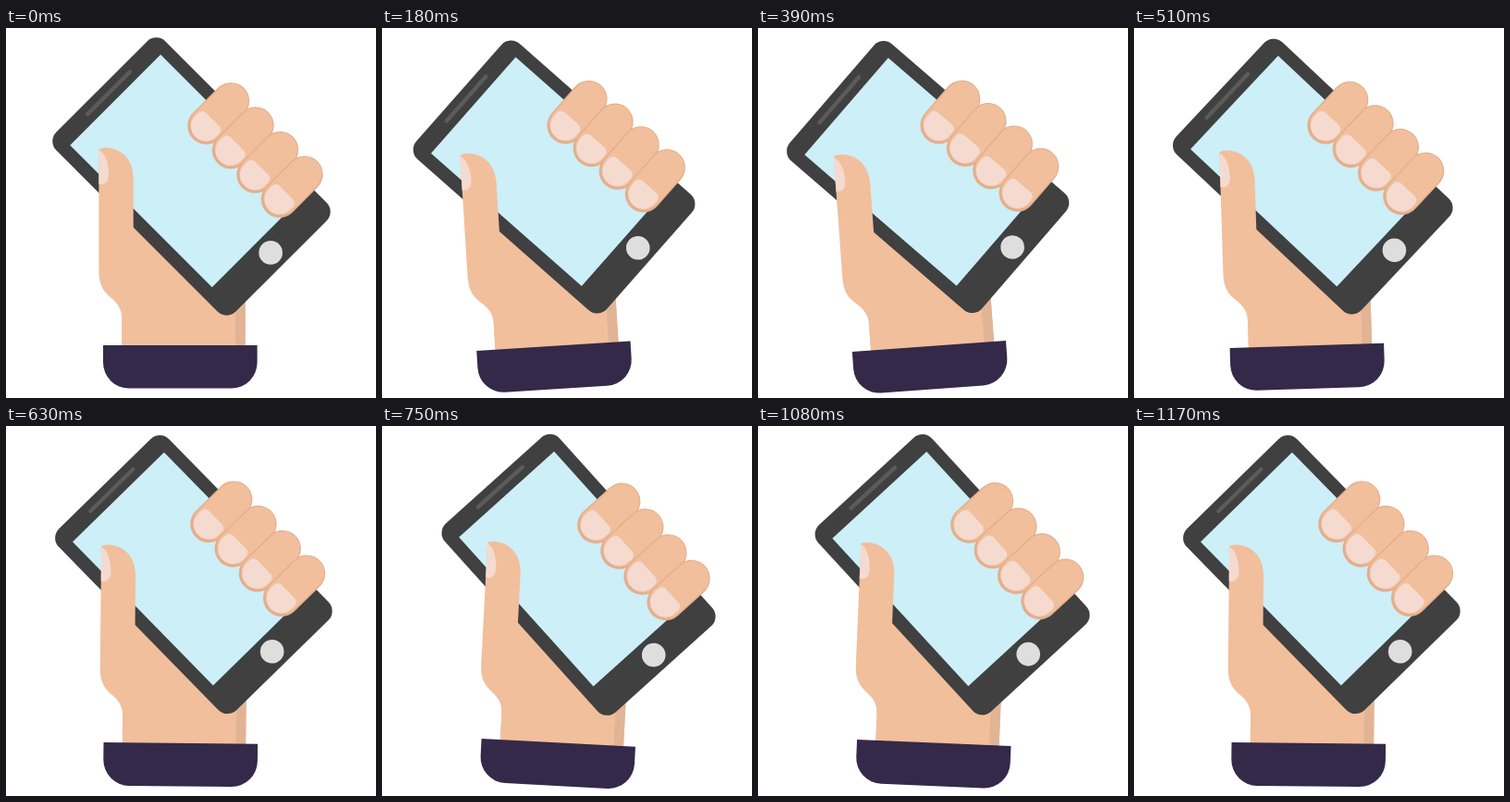
An HTML page with a canvas that plays this animation: 400 px wide and 400 px high, repeating every 1200 ms.

```html
<!DOCTYPE html>
<html lang="en">
<head>
<meta charset="utf-8">
<title>Waving phone</title>
<style>
  html, body { margin: 0; width: 100%; height: 100%; overflow: hidden; background: #fff; }
  canvas { display: block; }
</style>
</head>
<body>
<canvas id="stage" width="400" height="400"></canvas>
<script>
const ctx = document.getElementById('stage').getContext('2d');
const LOOP = 1200, STEP = 30, SWING = 6;
const PIVOT = { x: 200, y: 390 };
const SKIN = '#f1bf9c', SHADE = '#e3af8d', NAIL = '#f5dad0';

function fillPath(color, d) {
  ctx.fillStyle = color;
  ctx.fill(new Path2D(d));
}

function box(color, x, y, w, h, radii) {
  ctx.fillStyle = color;
  ctx.beginPath();
  ctx.roundRect(x, y, w, h, radii);
  ctx.fill();
}

// Draws in a frame moved to (x, y) and turned by deg
function placed(x, y, deg, draw) {
  ctx.save();
  ctx.translate(x, y);
  ctx.rotate(deg * Math.PI / 180);
  draw();
  ctx.restore();
}

function palm() {
  fillPath(SKIN, 'M125.3 345 V190 H137 L258.7 250 V345 Z');
  fillPath('#e1b495', 'M248 250 H258.7 V345 H248 Z');
}

function phone() {
  placed(200.5, 160.5, 45, () => {
    box('#404040', -137.2, -83.4, 274.4, 166.8, 14);
    box('#cceff8', -116.7, -69.5, 217.1, 138.4, 0);
    box('#5b5b5b', -129.3, -35, 4.4, 69, 2.2);
    ctx.fillStyle = '#dedede';
    ctx.beginPath();
    ctx.arc(118.8, -2.3, 12.8, 0, Math.PI * 2);
    ctx.fill();
  });
}

function thumb() {
  fillPath(SKIN, 'M100.4 131 Q103 129.3 108 129.3 C126 130.5 137.7 143 137.7 163 V345 H125.3 V315 ' +
    'C125.3 305 122 299 114 292 C106 285 100.4 279 100.4 262 Z');
  fillPath(NAIL, 'M100.4 132 C107 135 111 146 111 158 C111 165 108 169 103 169 L100.4 168.5 Z');
}

function finger(x, y) {
  placed(x, y, -45, () => {
    box(SHADE, -20, -20, 78, 40, 20);
    box(SKIN, -16.5, -18.5, 73.5, 37, 18.5);
    box(NAIL, -16.5, -16, 26.5, 32, [16, 6, 6, 16]);
  });
}

// Constant speed: left for a quarter of the loop, right for half, then back
function swingAngle(t) {
  return SWING * (1 - 4 * Math.abs((t + 0.75) % 1 - 0.5));
}

function render(now) {
  const t = Math.floor(now % LOOP / STEP) * STEP / LOOP;
  ctx.fillStyle = '#fff';
  ctx.fillRect(0, 0, 400, 400);
  placed(PIVOT.x, PIVOT.y, swingAngle(t), () => {
    ctx.translate(-PIVOT.x, -PIVOT.y);
    palm();
    phone();
    thumb();
    for (let i = 0; i < 4; i++) finger(216.3 + i * 26.5, 105.8 + i * 26.4);
    box('#35294a', 105, 343, 166.6, 46.6, [0, 0, 28, 28]);
  });
  requestAnimationFrame(render);
}

requestAnimationFrame(render);
</script>
</body>
</html>
```
